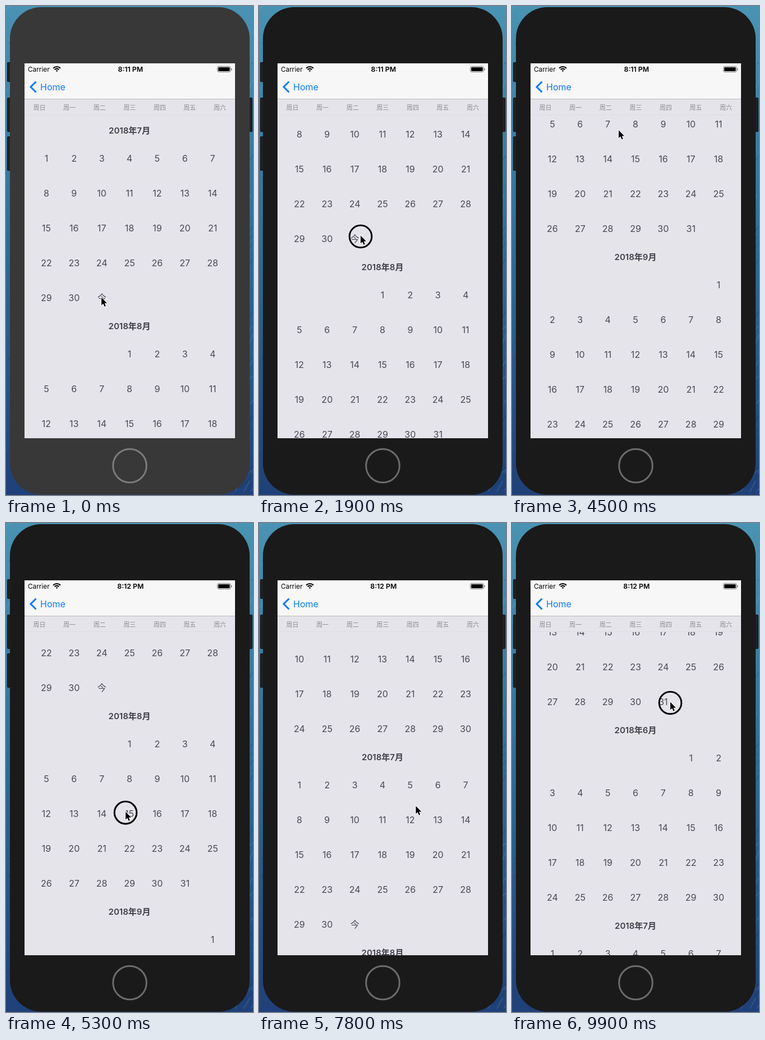
Animation, 440 px wide and 870 px high, one loop 10000 ms. Source, as an HTML page with a canvas:

```html
<!DOCTYPE html>
<html lang="zh">
<head>
<meta charset="utf-8">
<style>
html, body { margin: 0; width: 100%; height: 100%; overflow: hidden; background: #245585; }
canvas { display: block; }
</style>
</head>
<body>
<canvas id="stage" width="440" height="870"></canvas>
<script>
const g = document.getElementById('stage').getContext('2d');
const FONT = 'Inter, "Noto Sans CJK SC", "Noto Sans CJK", sans-serif';
const LOOP = 10000, LAG = 100;

const swipe = (start, end, x0, y0, x1, y1) => ({ start, end, x0, y0, x1, y1 });
const REST = { end: 0, x1: 170, y1: 520 };
const SWIPES = [
  swipe(1200, 1800, 174, 514.5, 181, 410),
  swipe(1900, 2500, 181, 410, 183, 262.5),
  swipe(3500, 3900, 199, 475, 195, 256),
  swipe(4520, 5670, 190, 222.5, 220, 605),
  swipe(6600, 7200, 264, 320, 288, 603.5),
  swipe(8740, 9300, 262, 305, 318, 605),
  swipe(9900, LOOP, 282, 320, 282, 320)
];

const ease = u => (1 - Math.cos(Math.PI * Math.min(1, Math.max(0, u)))) / 2;

// The pointer follows the swipes and glides from the end of one to the start of the next
function pointerAt(t) {
  let last = REST;
  const move = (x0, y0, x1, y1, k) => ({ x: x0 + (x1 - x0) * k, y: y0 + (y1 - y0) * k });
  for (const s of SWIPES) {
    if (t < s.start) return move(last.x1, last.y1, s.x0, s.y0, ease((t - last.end) / (s.start - last.end)));
    if (t < s.end) return move(s.x0, s.y0, s.x1, s.y1, ease((t - s.start) / (s.end - s.start)));
    last = s;
  }
}
// The list follows the finger a little late
const scrollAt = t => SWIPES.reduce((sum, s) =>
  sum + (s.y0 - s.y1) * ease((t - LAG - s.start) / (s.end - s.start)), 0);

function rect(x, y, w, h, color) {
  g.fillStyle = color;
  g.fillRect(x, y, w, h);
}
function round(x, y, w, h, r, color) {
  g.beginPath();
  g.roundRect(x, y, w, h, r);
  g.fillStyle = color;
  g.fill();
}
function stroke(color, width) {
  g.lineWidth = width;
  g.strokeStyle = color;
  g.stroke();
}
function ring(x, y, r, width, color, from = 0, to = 2 * Math.PI) {
  g.beginPath();
  g.arc(x, y, r, from, to);
  stroke(color, width);
}
function text(s, x, y, font, color, align = 'center') {
  g.font = font + ' ' + FONT;
  g.fillStyle = color;
  g.textAlign = align;
  g.fillText(s, x, y);
}

function wallpaper() {
  const sky = g.createLinearGradient(0, 0, 0, 870);
  ['#4a93b3', '#2d6c96', '#1f4078'].forEach((c, i) => sky.addColorStop(i / 2, c));
  rect(0, 0, 440, 870, sky);
  let seed = 7;
  const rnd = () => (seed = seed * 16807 % 2147483647) / 2147483647;
  for (let i = 0; i < 90; i++) {
    const x = rnd() * 32 + i % 2 * 408, y = rnd() * 870;
    g.beginPath();
    g.moveTo(x, y);
    g.lineTo(x + 10 + rnd() * 14, y - 10 - rnd() * 24);
    stroke(rnd() < .5 ? 'rgba(130,195,215,.2)' : 'rgba(10,45,95,.2)', 1.5);
  }
}

function phone(active) {
  const button = (x, y, h) => {
    round(x, y, 8, h, 2, '#101214');
    round(x + 1, y + 1, 6, h - 2, 2, '#202123');
  };
  button(2, 100, 35);
  button(2, 163, 61);
  button(2, 232, 61);
  button(431, 163, 61);
  round(7, 2, 427, 867.5, 56, active ? '#1a1a1a' : '#383838');
  ring(220.5, 818, 29.8, 3, active ? '#6c6c6c' : '#7b7b7b');
}

function days(scroll, touch) {
  for (let month = 4; month <= 9; month++) {
    const top = 221 + (month - 7) * 348 - scroll;
    const first = new Date(2018, month - 1, 1).getDay(), count = new Date(2018, month, 0).getDate();
    text(`2018年${month}月`, 220, top + 5.5, '600 15px', '#3f3f4b');
    for (let d = 1; d <= count; d++) {
      const n = first + d - 1;
      const x = 220 + (n % 7 - 3) * 49.35, y = top + 50 + Math.floor(n / 7) * 62;
      const lit = touch && Math.abs(touch.x - x) < 24.6 && Math.abs(touch.y - y) < 31;
      text(month === 7 && d === 31 ? '今' : d, x, y + 5.8, '400 16px', lit ? '#8f8f97' : '#494956');
    }
  }
}

function bars(clock) {
  rect(33, 102, 375, 64, '#f7f7f7');
  rect(33, 165, 375, 1, '#b9b9bd');
  rect(33, 166, 375, 28, '#e5e4ea');
  rect(33, 193, 375, 1, '#dddce2');
  [...'日一二三四五六'].forEach((c, i) => text('周' + c, 59.5 + i * 53.57, 184.7, '400 11px', '#8b8b91'));

  text('Carrier', 39, 116.5, '400 11.8px', '#000', 'left');
  text(clock, 221.8, 116.5, '600 12.3px', '#000');
  for (const r of [9, 5.3, 1.6]) ring(90.5, 117, r, 2.2, '#000', -2.36, -.78);

  g.beginPath();
  g.roundRect(376.5, 107.5, 23.5, 10, 2.5);
  stroke('#777', 1);
  round(378, 109, 20.5, 7, 1.2, '#000');
  round(401, 110.7, 1.4, 3.8, .7, '#777');

  g.beginPath();
  g.moveTo(53.5, 134.5);
  g.lineTo(44, 144);
  g.lineTo(53.5, 153.5);
  stroke('#0a7aff', 3);
  text('Home', 61, 150, '400 16px', '#0a7aff', 'left');
}

const ARROW = new Path2D('M0 0V14L3.2 11L5.5 16.2L7.8 15.2L5.6 10.2H10Z');
function arrow(x, y) {
  g.save();
  g.translate(x, y - 1.5);
  g.lineWidth = 1.8;
  g.strokeStyle = '#fff';
  g.stroke(ARROW);
  g.fillStyle = '#000';
  g.fill(ARROW);
  g.restore();
}

function draw(t) {
  const p = pointerAt(t), scroll = scrollAt(t);
  const press = SWIPES.find(s => t >= s.start && t < s.end + LAG);
  const held = press ? t - press.start : 0;
  let touch = null;
  if (held >= LAG && held <= 2 * LAG) {
    touch = { x: press.x0, y: press.y0 + scrollAt(press.start) - scroll };
  }
  wallpaper();
  phone(t >= SWIPES[0].start);
  g.save();
  g.beginPath();
  g.rect(33, 102, 375, 667);
  g.clip();
  rect(33, 102, 375, 667, '#e5e4ea');
  days(scroll, touch);
  bars(t < 4600 ? '8:11 PM' : '8:12 PM');
  g.restore();
  if (press) ring(p.x, p.y, 19.8, 3, '#000');
  arrow(p.x, p.y);
}

const start = performance.now();
function tick() {
  draw(Math.floor((performance.now() - start) % LOOP / 100) * 100);
  requestAnimationFrame(tick);
}
tick();
</script>
</body>
</html>
```
